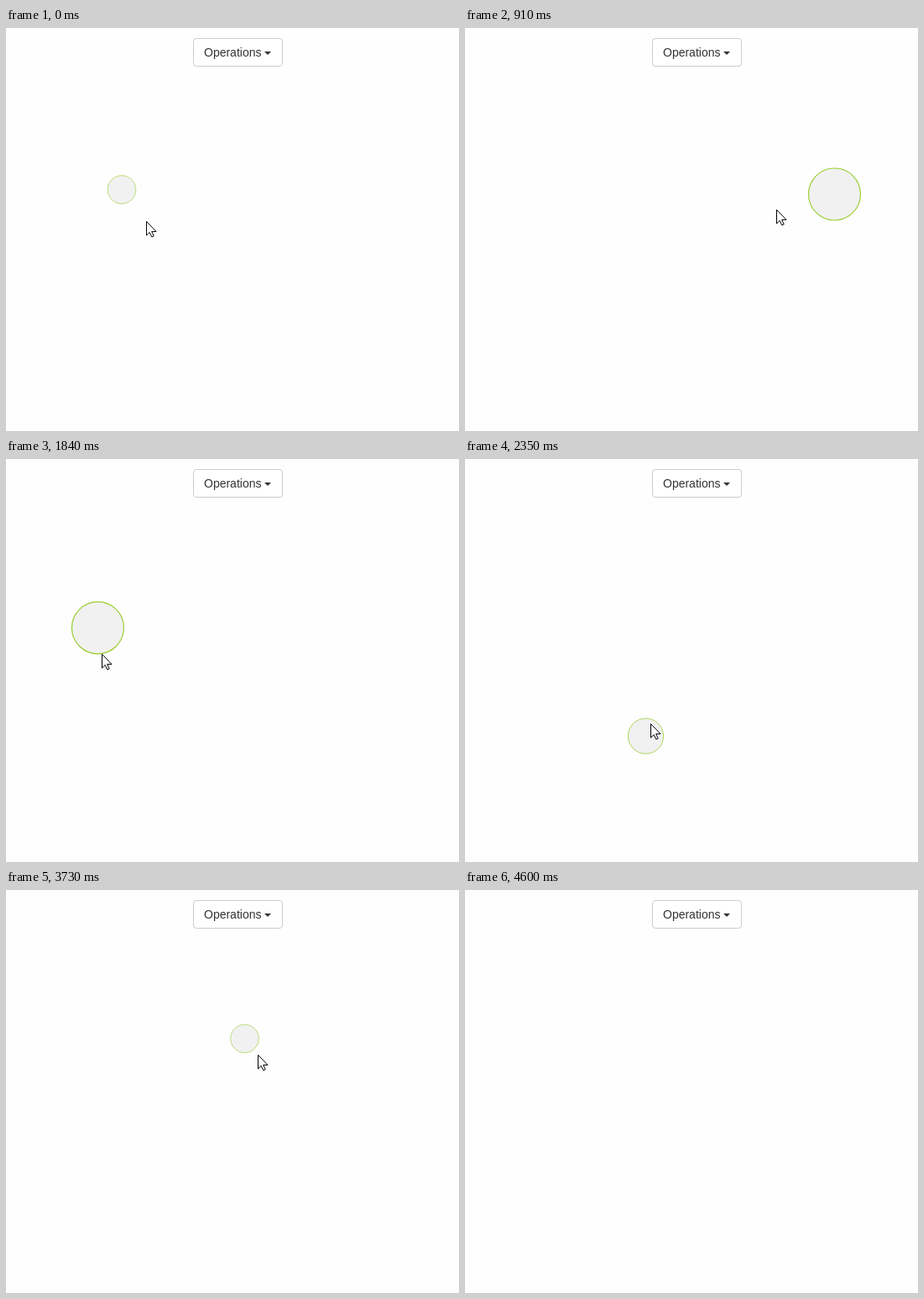
An HTML page that plays this animation: 540 by 480 pixels, repeating every 4880 ms.

```html
<!DOCTYPE html>
<html lang="en">
<head>
<meta charset="utf-8">
<title>Circle follows the pointer</title>
<style>
html, body { margin: 0; width: 100%; height: 100%; overflow: hidden; background: #fefefe; }
body { position: relative; font: 14px/20px "Liberation Sans", Arial, sans-serif; color: #333; }
svg { position: absolute; left: 0; top: 0; }
#button, #menu { position: absolute; left: 223px; box-sizing: border-box; background: #fff; border: 1px solid #ccc; border-radius: 4px; }
#button { top: 12px; width: 107px; height: 34px; padding: 6px 12px; white-space: nowrap; }
#button.open { background: #e6e6e6; border-color: #adadad; box-shadow: inset 0 3px 5px rgba(0,0,0,.125); }
#button i {
  display: inline-block; vertical-align: middle;
  border: 4px solid transparent; border-top-color: #333; border-bottom: 0;
}
#menu {
  top: 48px; width: 160px; height: 116px; padding: 5px 0;
  box-shadow: 0 1px 2px #ccc, 0 6px 1px 2px #e5e5e5;
}
#menu div { padding: 3px 20px; }
#menu .hover { background: #f0f0f0; }
</style>
</head>
<body>
<svg width="540" height="480"><circle id="ball" fill="#f1f1f1" stroke="#9acd32"/></svg>
<div id="button">Operations <i></i></div>
<div id="menu"><div>Rename</div><div>Add</div><div>Copy</div><div>Delete</div></div>
<svg width="540" height="480">
  <g id="cursor" fill="#fff" stroke="#000" stroke-linejoin="round">
    <path id="arrow" d="M.5 .5V17L4.2 13.4L6.8 18.9L9.2 17.8L6.7 12.4H12Z"/>
    <path id="hand" d="M-1.5 15V2Q-1.5 .5 0 .5T1.5 2V12V8.5Q3 7 4.5 9V12.5V9Q6 7.8 7.5 9.8V13V9.8Q10 9.3 10.5 11.5V15Q10.5 18 8.5 20.5V23.5H0V21Q-3 17.5-6 13.5Q-6 11-3.5 11.5Z"/>
  </g>
</svg>
<script>
const LOOP = 4880, STEP = 30, LAG = 90;

// Turning points of the pointer: time, x, y
const path = [
  [-90, 138, 192.5], [0, 167, 230], [70, 124, 172], [330, 170, 380], [550, 246, 404],
  [740, 480, 112], [820, 440.5, 198], [910, 371, 216], [1030, 428, 162], [1090, 380, 214],
  [1300, 332, 270.5], [1390, 322, 279], [1530, 235, 392], [1760, 109, 200], [2050, 156, 372],
  [2260, 215.5, 330], [2350, 221, 315], [2650, 292, 158], [2775, 284, 32], [2830, 294, 71],
  [2890, 284, 112], [2920, 284, 93], [3160, 284, 152], [3500, 284, 152], [3640, 284.5, 177],
  [3730, 300, 196], [3960, 455, 455], [4200, 505, 520], [4490, 507, 520], [4560, 507, 478]
];

const $ = id => document.getElementById(id);
const rows = [...$("menu").children];
const clamp = (v, lo, hi) => Math.min(hi, Math.max(lo, v));

function setAttrs(el, attrs) {
  for (const name in attrs) el.setAttribute(name, attrs[name]);
}

function slope(i, axis) {
  const a = path[i], b = path[i + 1];
  return (b[axis] - a[axis]) / (b[0] - a[0]);
}

// Zero where the direction reverses, so the curve never overshoots.
function tangent(i, axis) {
  if (i === 0 || i === path.length - 1) return 0;
  const p = slope(i - 1, axis), q = slope(i, axis);
  return p * q > 0 ? 2 * p * q / (p + q) : 0;
}

function pointerAt(time) {
  const t = clamp(time, path[0][0], path.at(-1)[0]);
  const i = Math.max(0, path.findIndex(k => k[0] >= t) - 1);
  const a = path[i], b = path[i + 1];
  const span = b[0] - a[0], u = (t - a[0]) / span, w = 1 - u;
  return [1, 2].map(axis =>
    a[axis] * w * w * (1 + 2 * u) + b[axis] * u * u * (3 - 2 * u)
    + span * u * w * (w * tangent(i, axis) - u * tangent(i + 1, axis)));
}

function draw(now) {
  const t = Math.max(0, 10 + STEP * Math.floor((now % LOOP - 10) / STEP));
  const [x, y] = pointerAt(t);
  const visibility = t < 4600 ? "visible" : "hidden";

  // The ball trails the pointer and swells with its own recent travel.
  const [cx, cy] = pointerAt(t - LAG);
  const [px, py] = pointerAt(t - LAG - 210);
  const r = clamp(13.8 + Math.hypot(cx - px, cy - py) / 10, 16.8, 31);
  setAttrs($("ball"), { cx, cy, r, "stroke-width": r / 26, visibility });

  const open = t >= 2790 && t < 3650;
  const overLink = y < 46 || open && y < 158;
  setAttrs($("cursor"), { transform: `translate(${Math.round(x)} ${Math.round(y)})`, visibility });
  $("arrow").style.display = overLink ? "none" : "";
  $("hand").style.display = overLink ? "" : "none";

  $("button").className = open ? "open" : "";
  $("menu").style.display = open ? "" : "none";
  const hovered = Math.floor((pointerAt(t - STEP)[1] - 54) / 26);
  rows.forEach((row, n) => row.className = n === hovered ? "hover" : "");
}

function tick() {
  draw(performance.now());
  requestAnimationFrame(tick);
}
tick();
</script>
</body>
</html>
```
